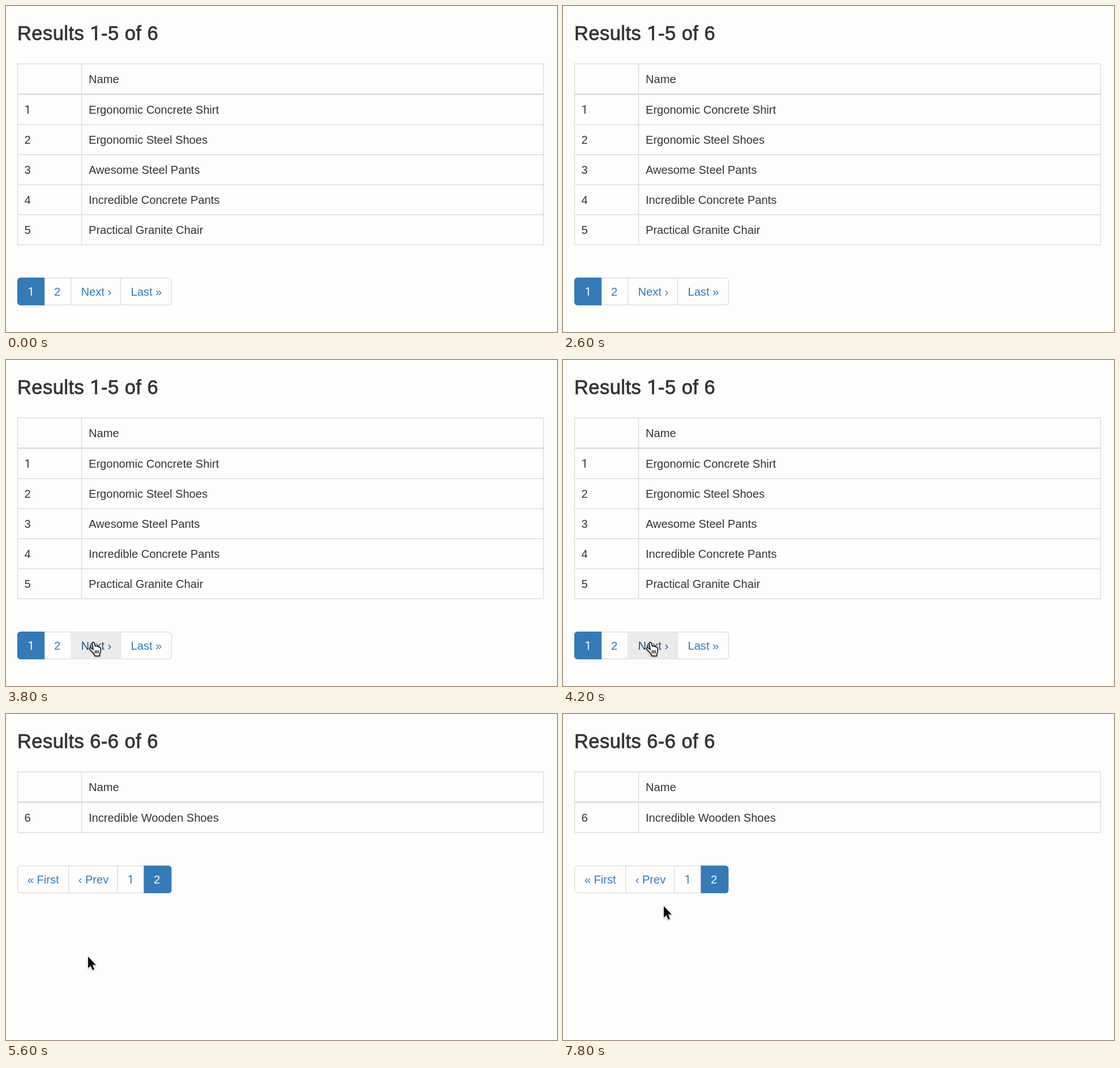
Write an HTML page that moves like this. It is 973x575 px and loops after 8 s.

```html
<!DOCTYPE html>
<html lang="en">
<head>
<meta charset="utf-8">
<title>Paginated results</title>
<style>
  html, body { margin: 0; width: 100%; height: 100%; overflow: hidden; background: #fdfdfc; }
  svg { display: block; width: 973px; height: 575px; }
  text { font: 20.1px "Liberation Sans", Arial, sans-serif; fill: #333; white-space: pre; }
  .one { font-family: Roboto, sans-serif; }
  .title { font-size: 34.4px; letter-spacing: .5px; stroke: #333; stroke-width: .8px; }
  .grid { fill: none; stroke: #ddd; stroke-width: 1.4; }
  .link { fill: #337ab7; }
  .active { fill: #fff; }
  .hover .next { fill: #23527c; }
  .cell { fill: none; }
  .hover .cell.next { fill: #ebebeb; }
  .cursor { filter: drop-shadow(0 1.5px 1.5px rgba(0, 0, 0, .35)); }
</style>
</head>
<body>
<svg id="stage" viewBox="0 0 973 575"></svg>
<script>
const LEFT = 20.5, RIGHT = 949.3, SPLIT = 133.5, ROW = 53;

// The numeral 1 is set in a face that draws it without a foot.
const label = (x, y, content, cls = "") =>
  `<text x="${x}" y="${y}" class="${cls}">${content.replace(/1/g, '<tspan class="one">1</tspan>')}</text>`;

function table(first, names) {
  const bottom = 156.3 + ROW * names.length;
  const rules = names.map((_, i) => `M${LEFT} ${156.3 + ROW * (i + 1)}H${RIGHT}`).join("");
  const rows = names.map((name, i) =>
    label(32.5, 190 + ROW * i, String(first + i)) + label(146, 190 + ROW * i, name)).join("");
  return `<path class="grid" d="M${LEFT} 102H${RIGHT}M${LEFT} 101.3V${bottom}M${SPLIT} 102V${bottom}M${RIGHT} 101.3V${bottom}${rules}"/>
    <path class="grid" style="stroke-width:2.8" d="M${LEFT} 155.7H${RIGHT}"/>
    ${label(146, 136, "Name")}${rows}`;
}

// Each item is [text, left edge, text x, optional class].
function pager(top, right, items) {
  const parts = items.map(([text, x, textX, cls = ""], i) => {
    const end = items[i + 1]?.[1] ?? right;
    const round = i ? "0 6px 6px 0" : "6px 0 0 6px";
    const box = cls === "active"
      ? `<rect x="${i ? x : x - .7}" y="${top - .7}" width="${end - x + .7}" height="49" fill="#337ab7" style="clip-path:inset(0 round ${round})"/>`
      : `<rect x="${x}" y="${top}" width="${end - x}" height="47.6" class="cell ${cls}"/>`;
    const edge = i ? `<path class="grid" d="M${x} ${top}v47.6"/>` : "";
    return { box, edge, text: label(textX, top + 31.3, text, "link " + cls) };
  });
  const all = key => parts.map(p => p[key]).join("");
  return `<rect x="${LEFT}" y="${top}" width="${right - LEFT}" height="47.6" rx="5.5" class="grid"/>
    ${all("edge")}${all("box")}${all("text")}`;
}

const page = (id, title, ...parts) =>
  `<g id="${id}">${label(20, 60.3, title, "title")}${parts.join("")}</g>`;

const stage = document.getElementById("stage");
stage.innerHTML =
  page("page1", "Results 1-5 of 6",
    table(1, ["Ergonomic Concrete Shirt", "Ergonomic Steel Shoes", "Awesome Steel Pants",
      "Incredible Concrete Pants", "Practical Granite Chair"]),
    pager(479.7, 292.5, [["1", LEFT, 38.5, "active"], ["2", 68, 85],
      ["Next ›", 115, 132.5, "next"], ["Last »", 202.3, 220.5]])) +
  page("page2", "Results 6-6 of 6",
    table(6, ["Incredible Wooden Shoes"]),
    pager(267.9, 291.8, [["« First", LEFT, 37.8], ["‹ Prev", 110.7, 127.7],
      ["1", 196.6, 214.5], ["2", 243.3, 261, "active"]])) +
  `<g id="cursor" class="cursor">
    <path id="arrow" transform="scale(1.25)" stroke="#fff" stroke-width="1.1" paint-order="stroke"
      d="M0 0V16L3.7 12.5L6.3 18.7L8.7 17.7L6.1 11.6H11Z"/>
    <g id="hand" stroke="#000" stroke-width="1.4" stroke-linejoin="round" fill="#fff">
      <path d="M1.5 4Q.5 1 3 1Q5 1 5.5 3.5L6.5 8Q8 6 10 8.5Q12 7 13 9.5Q16 9 16 12V17Q15.5 20 14.5 21V25H6Q5 22 2.5 19L-3 13.5Q-4.5 11-2 10.5Q0 10.5 3 14Z"/>
      <path d="M6.5 15v5.5M9.3 15v5.5M12.1 15v5.5"/>
    </g>
  </g>`;

// Pointer path: time, x, y.
const path = [
  [2800, 148, 578], [3000, 149, 546], [3200, 149, 510], [3600, 149, 510],
  [3800, 151, 497], [4800, 151, 497], [5000, 150, 481], [5600, 145, 428],
  [6000, 145, 428], [7200, 166, 365], [7600, 178, 339], [8000, 178, 339]
];

function pointerAt(t) {
  const i = path.findIndex(p => p[0] > t);
  const [t0, x0, y0] = path[i - 1], [t1, x1, y1] = path[i];
  const k = (t - t0) / (t1 - t0);
  return [x0 + (x1 - x0) * k, y0 + (y1 - y0) * k];
}

const el = id => document.getElementById(id);
const show = (id, on) => { el(id).style.display = on ? "" : "none"; };

function draw(now) {
  const t = Math.floor(now % 8000 / 200) * 200;
  const second = t >= 4400, hover = t >= 3400 && !second, visible = t >= 2800;
  show("page1", !second);
  show("page2", second);
  show("arrow", !hover);
  show("hand", hover);
  show("cursor", visible);
  stage.classList.toggle("hover", hover);
  if (visible) el("cursor").setAttribute("transform", `translate(${pointerAt(t)})`);
  requestAnimationFrame(draw);
}
draw(0);
</script>
</body>
</html>
```
